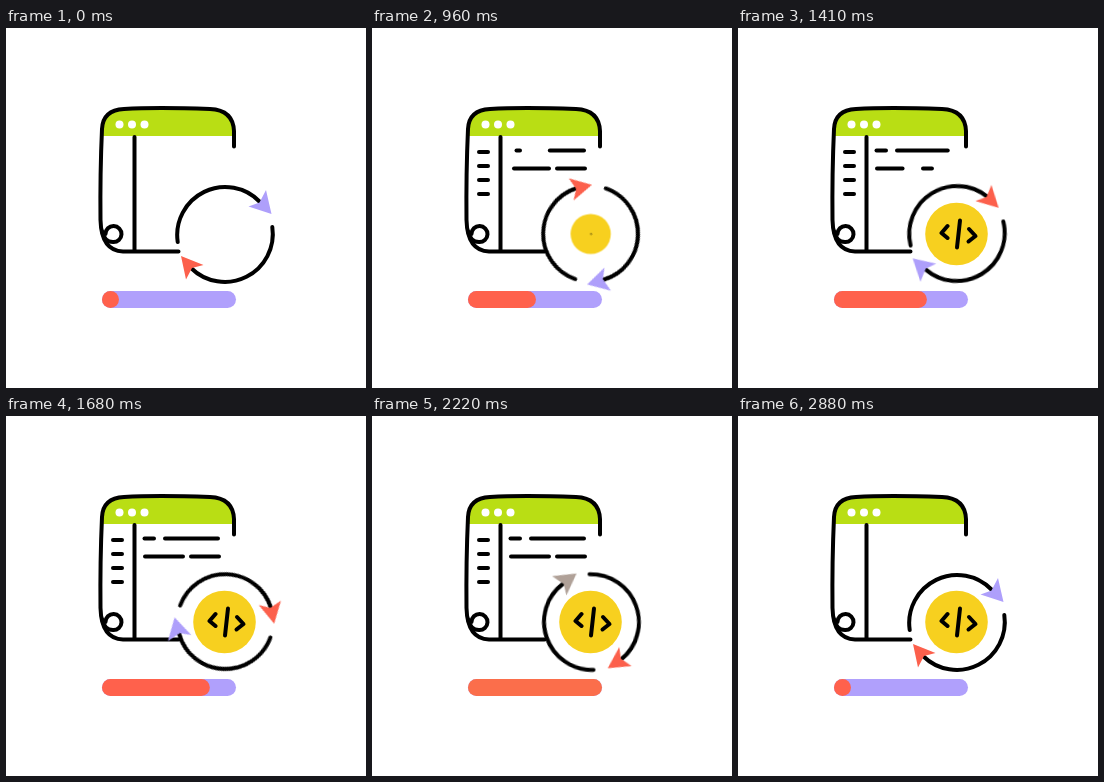
An HTML page for the animation above (2910 ms loop, 360 by 360 pixels).

```html
<!DOCTYPE html>
<html lang="en">
<head>
<meta charset="utf-8">
<title>Code update</title>
<style>
  html, body { margin: 0; width: 100%; height: 100%; overflow: hidden; background: #fff; }
  svg { display: block; width: 100%; height: 100%; }
  .ink { fill: none; stroke: #000; stroke-width: 4; stroke-linecap: round; stroke-linejoin: round; }
  .bar { fill: none; stroke-width: 17; stroke-linecap: round; }
  .spin, .badge, .code { transform-origin: 219px 206px; animation: 2910ms linear infinite; }
  .spin { animation-name: spin; }
  .badge { animation-name: badge; }
  .code { animation-name: code; }
  .fill { stroke: #ff614c; stroke-dasharray: 0 300; animation: fill 2910ms linear infinite, warm 2910ms step-end infinite; }
  .tail { fill: #ae9ffb; animation: fade 2910ms step-end infinite; }

  @keyframes spin {
    0%, 1% { transform: rotate(0deg); }
    99%, 100% { transform: rotate(360deg); }
  }
  @keyframes badge {
    0%, 29.9% { transform: scale(0); }
    33% { transform: scale(.64); }
    39%, 40.2% { transform: scale(1.08); }
    45.4%, 100% { transform: scale(1); }
  }
  @keyframes code {
    0%, 32.6% { transform: scale(0); }
    40.2% { transform: scale(1.3); }
    46.4%, 100% { transform: scale(1); }
  }
  @keyframes fill {
    0%, 1.4% { stroke-dasharray: 0 300; }
    74%, 77.6% { stroke-dasharray: 117 300; }
    98.3%, 100% { stroke-dasharray: 0 300; }
  }
  @keyframes warm {
    0% { stroke: #ff614c; }
    74% { stroke: #fb6e4b; }
    78% { stroke: #ff614c; }
  }
  @keyframes fade {
    0% { fill: #ae9ffb; }
    74% { fill: #b0a198; }
    78% { fill: #ae9ffb; }
  }
</style>
</head>
<body>
<svg viewBox="0 0 360 360">
  <!-- window -->
  <path fill="#b9de14" d="M96 108V101Q98 82 120 80.5L150 79.5L204 81Q227 83 228 103V108Z"/>
  <g fill="#fff">
    <circle cx="113.5" cy="96.5" r="4"/>
    <circle cx="126" cy="96.5" r="4"/>
    <circle cx="138.5" cy="96.5" r="4"/>
  </g>
  <g class="ink">
    <path d="M228 118.5V103Q227 82 204 81Q150 79 118 81Q97 82 96 101Q94 145 94.5 192C95 211 102 223 117 223.5H172.500"/>
    <path d="M96 203C98 211 101 214 107 214A8 8 0 1 0 99.500 206"/>
    <path d="M128.500 109V223"/>
  </g>
  <g class="ink" id="lines"></g>

  <!-- progress -->
  <path class="bar" stroke="#b0a0fc" d="M104.500 271.500H221.500"/>
  <path class="bar fill" d="M104.500 271.500H221.500"/>

  <!-- badge -->
  <circle class="badge" cx="218.500" cy="206" r="31.300" fill="#f7d01f"/>
  <g class="ink code">
    <path d="M209.500 198L203.500 205L209.500 210"/>
    <path d="M222 192.500L219 219.500"/>
    <path d="M231 201L237.500 208L230.500 213.500"/>
  </g>

  <!-- turning arrows -->
  <g class="spin">
    <path class="ink" d="M171.700 214A48 48 0 0 1 254 174"/>
    <path class="ink" d="M266.300 199A48 48 0 0 1 185 240"/>
    <path class="tail" d="M265.500 186L260 162L253.500 174.500L242.500 178.500Z"/>
    <path fill="#fc604c" d="M175 228L180 251.500L186 240L197.500 237Z"/>
  </g>
</svg>
<script>
  const LOOP = 2910;
  const lines = document.getElementById('lines');

  // each pass: grow start, grow end, erase start, erase end (ms)
  function addLine(x1, x2, y, passes) {
    const path = document.createElementNS('http://www.w3.org/2000/svg', 'path');
    path.setAttribute('d', `M${x1} ${y}H${x2}`);
    path.setAttribute('pathLength', 100);
    lines.append(path);

    const key = (t, opacity, length, start) => ({
      offset: t / LOOP,
      opacity,
      strokeDasharray: `${length} 300`,
      strokeDashoffset: -start
    });
    const keys = [key(0, 0, 0, 0)];
    for (const [a, b, c, d] of passes) {
      keys.push(key(a, 0, 0, 0), key(a, 1, 0, 0), key(b, 1, 100, 0),
                key(c, 1, 100, 0), key(d, 1, 100, 100), key(d, 0, 0, 0));
    }
    keys.push(key(LOOP, 0, 0, 0));
    path.animate(keys, { duration: LOOP, iterations: Infinity });
  }

  for (let i = 0; i < 4; i++) {
    const grow = 60 + 75 * i, erase = 2480 + 60 * i;
    addLine(107, 116, 124 + 14 * i, [[grow, grow + 110, erase, erase + 130]]);
  }
  addLine(138.5, 148, 122.5, [[415, 480, 920, 985], [1165, 1220, 2400, 2460]]);
  addLine(159, 212, 122.5, [[460, 680, 890, 1090], [1210, 1420, 2430, 2630]]);
  addLine(139, 177, 140.5, [[560, 780, 940, 1205], [1290, 1470, 2500, 2720]]);
  addLine(185, 213, 140.5, [[660, 830, 1020, 1270], [1360, 1520, 2580, 2800]]);
</script>
</body>
</html>
```
